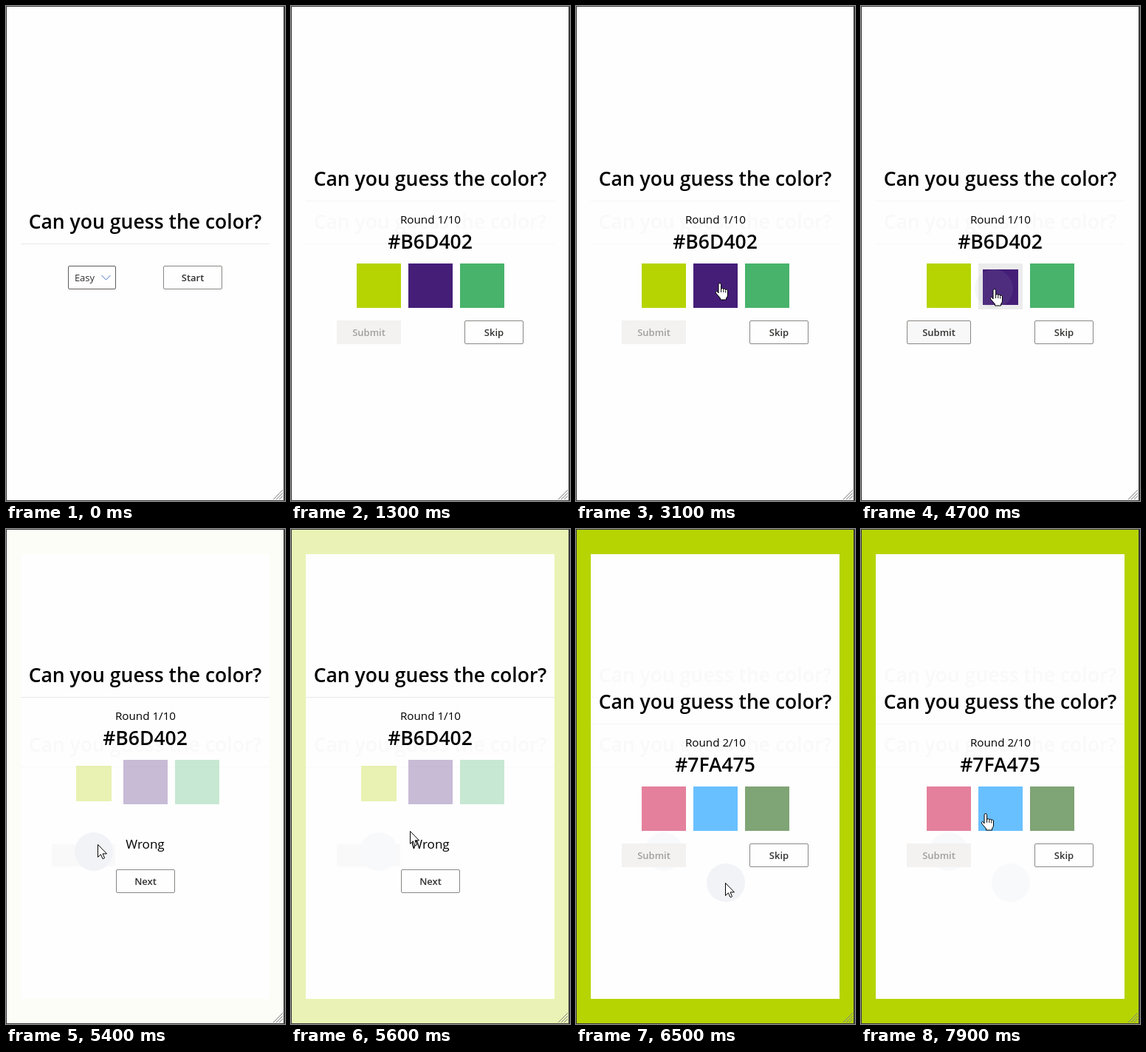
Recreate the animation shown at these times as an HTML page with a canvas. Size 378 by 669 pixels, loop 8000 ms.

```html
<!DOCTYPE html>
<html lang="en">
<head>
<meta charset="utf-8">
<title>Guess the color</title>
<style>
  html, body { margin: 0; width: 100%; height: 100%; overflow: hidden; background: #fefefe; }
  canvas { display: block; }
</style>
</head>
<body>
<canvas id="stage" width="378" height="669"></canvas>
<script>
const ctx = document.getElementById('stage').getContext('2d');
const W = 378, H = 669, MID = W / 2, LOOP = 8000, TICK = 100;
const LIME = '#b6d402', PAPER = '#fefefe', GHOST = '#f9f9f9', EDGE = '#3a3a3a';
const ROUND1 = [LIME, '#451e78', '#48b36b'];
const ROUND2 = ['#e4809c', '#69c0ff', '#7fa475'];

// When each screen begins
const PLAY = 1100, PICK = 4600, RESULT = 5400, NEXT = 6400;

// Pointer moves; bow lifts the middle of the way, click is the time of a press at its end
const HOME = { x: 348, y: 123 };
const MOVES = [
  { from: 200, to: 800, x: 262, y: 362, click: 800 },
  { from: 1700, to: 2500, x: 221, y: 355, bow: 46 },
  { from: 2500, to: 3100, x: 194, y: 374 },
  { from: 3400, to: 4400, x: 180, y: 382, click: PICK },
  { from: 4700, to: 5100, x: 119, y: 436, click: 5200 },
  { from: 5300, to: 5900, x: 205, y: 468, bow: 44 },
  { from: 5900, to: 6200, x: 203, y: 478, click: 6300 },
  { from: 6500, to: 7200, x: 212, y: 371 },
  { from: 7200, to: 7900, x: 168, y: 384 }
];
const CLICKS = MOVES.filter(m => m.click);

const ARROW = new Path2D('M-.5.5v17l3.9-3.7 2.7 6 2.5-1.1-2.6-5.8h5.5z');
const HAND = new Path2D('M-1 14V2.5a1.8 1.8 0 0 1 3.6 0V9a1.6 1.6 0 0 1 3.2.3 1.5 1.5 0 0 1 3 .8 1.4 1.4 0 0 1 2.7.9V16q0 3-2 5v2h-8v-2l-5.5-6.5q-1.5-2.3.3-3 1.2-.4 2.7 2.5z');
const KNUCKLES = new Path2D('M2.6 9v4M5.8 9.5v3.5M8.8 10.5v3');
const CHEVRON = new Path2D('M129.5 364l6 6 6-6');

let hot = [];   // clickable areas of the current screen

const clamp = v => Math.max(0, Math.min(1, v));
const ease = p => p * p * (3 - 2 * p);

function box(x, y, w, h, color) {
  ctx.fillStyle = color;
  ctx.fillRect(x, y, w, h);
}

function text(str, x, y, size, weight = 600, color = '#000') {
  ctx.font = `${weight} ${size}px "Open Sans", "Noto Sans", sans-serif`;
  ctx.textAlign = 'center';
  ctx.fillStyle = color;
  ctx.fillText(str, x, y);
}

function outline(x, y, w, fill, stroke) {
  ctx.beginPath();
  ctx.roundRect(x + .5, y + .5, w - 1, 31, 1.5);
  ctx.fillStyle = fill;
  ctx.fill();
  ctx.lineWidth = 1;
  ctx.strokeStyle = stroke;
  ctx.stroke();
}

function button(label, x, y, w = 80, fill = PAPER, enabled = true) {
  if (enabled) {
    outline(x, y, w, fill, '#8a8886');
    hot.push([x, y, w, 32]);
  } else {
    box(x, y, w, 32, '#f3f2f1');
  }
  text(label, x + w / 2, y + 21, 13, 600, enabled ? '#323130' : '#a19f9d');
}

function circle({ x, y }, r, color) {
  ctx.beginPath();
  ctx.arc(x, y, r, 0, Math.PI * 2);
  ctx.fillStyle = color;
  ctx.fill();
}

function title(y, color = '#000', rule = '#e8e8e8') {
  text('Can you guess the color?', MID - .5, y, 26.55, 600, color);
  box(20, y + 20, 337, 1, rule);
}

function tiles(colors, y, small, framed) {
  colors.forEach((color, i) => {
    const x = 89 + 70 * i, on = i === small;
    hot.push([x, y, 60, 60]);
    if (on && framed) box(x, y, 60, 62, '#ececec');
    if (on) box(x + 6, y + 8, 48, 48, color);
    else box(x, y, 60, 60, color);
  });
}

function heading(round, code, top, rule) {
  title(top, '#000', rule);
  text(`Round ${round}/10`, MID, top + 51, 15.2, 400);
  text(code, MID - .5, top + 85, 26.5);
}

function startScreen() {
  title(301);
  outline(84, 351, 65, PAPER, '#605e5c');
  text('Easy', 106.5, 372, 13, 400, '#323130');
  ctx.strokeStyle = '#3f74b8';
  ctx.stroke(CHEVRON);
  button('Start', 213, 351);
}

function guessScreen(round, code, colors, picked) {
  heading(round, code, 243, '#f5f5f5');
  tiles(colors, 348, picked, true);
  button('Submit', 62, 425, 87, '#f8f8f8', picked >= 0);
  button('Skip', 235, 425);
}

function resultScreen() {
  heading(1, '#B6D402', 207);
  ctx.globalAlpha = .3;
  tiles(ROUND1, 312, 0);
  ctx.globalAlpha = 1;
  text('Wrong', MID - .5, 432, 17.1, 400);
  button('Next', 149, 460);
}

function backdrop(t) {
  box(0, 0, W, H, PAPER);
  if (t >= RESULT) {
    ctx.globalAlpha = clamp((t - 5375) / 775);
    box(0, 0, W, H, LIME);
    ctx.globalAlpha = 1;
    box(20, 34, 337, 601, PAPER);
  }
  // Faint traces of earlier screens
  if (t >= PLAY) title(301, GHOST, GHOST);
  if (t >= NEXT) title(207, GHOST, GHOST);
  else if (t >= RESULT) box(62, 426, 86, 30, GHOST);
  for (const c of CLICKS) {
    if (c.click > PICK && t > c.click) circle(c, 26, '#f7f9fb');
  }
}

function ripples(t) {
  for (const c of CLICKS) {
    const p = (t - c.click) / 400;
    if (p >= 0 && p < 1) circle(c, 26 * clamp(.5 + 2 * p), `rgba(150,165,190,${.14 * (1 - p)})`);
  }
}

function pointerAt(t) {
  let { x, y } = HOME;
  for (const m of MOVES) {
    if (t < m.from) break;
    const p = ease(clamp((t - m.from) / (m.to - m.from)));
    x += (m.x - x) * p;
    y += (m.y - y) * p - (m.bow || 0) * 4 * p * (1 - p);
  }
  return [Math.round(x), Math.round(y)];
}

function pointer(t) {
  if (t < 200 || (t >= PLAY && t < 1700)) return;
  const [px, py] = pointerAt(t);
  const over = hot.some(([x, y, w, h]) => px >= x && px <= x + w && py >= y && py <= y + h);
  const shape = over ? HAND : ARROW;
  ctx.save();
  ctx.translate(px, py);
  ctx.fillStyle = '#fff';
  ctx.strokeStyle = '#000';
  ctx.lineWidth = 1;
  ctx.fill(shape);
  ctx.stroke(shape);
  if (over) ctx.stroke(KNUCKLES);
  ctx.restore();
}

function windowEdge() {
  ctx.strokeStyle = '#808080';
  ctx.lineWidth = 1;
  ctx.beginPath();
  for (let d = 5; d <= 13; d += 4) {
    ctx.moveTo(375 - d, 667);
    ctx.lineTo(375, 667 - d);
  }
  ctx.stroke();
  box(0, 0, W, 1, EDGE);
  box(0, 0, 1, H, EDGE);
  box(W - 2, 0, 2, H, EDGE);
  box(0, H - 1, W, 1, EDGE);
}

function draw(now) {
  const t = Math.floor(now % LOOP / TICK) * TICK;
  hot = [];
  backdrop(t);
  if (t < PLAY) startScreen();
  else if (t < RESULT) guessScreen(1, '#B6D402', ROUND1, t < PICK ? -1 : 1);
  else if (t < NEXT) resultScreen();
  else guessScreen(2, '#7FA475', ROUND2, -1);
  ripples(t);
  pointer(t);
  windowEdge();
}

const began = performance.now();
function loop() {
  draw(performance.now() - began);
  requestAnimationFrame(loop);
}
loop();
</script>
</body>
</html>
```
